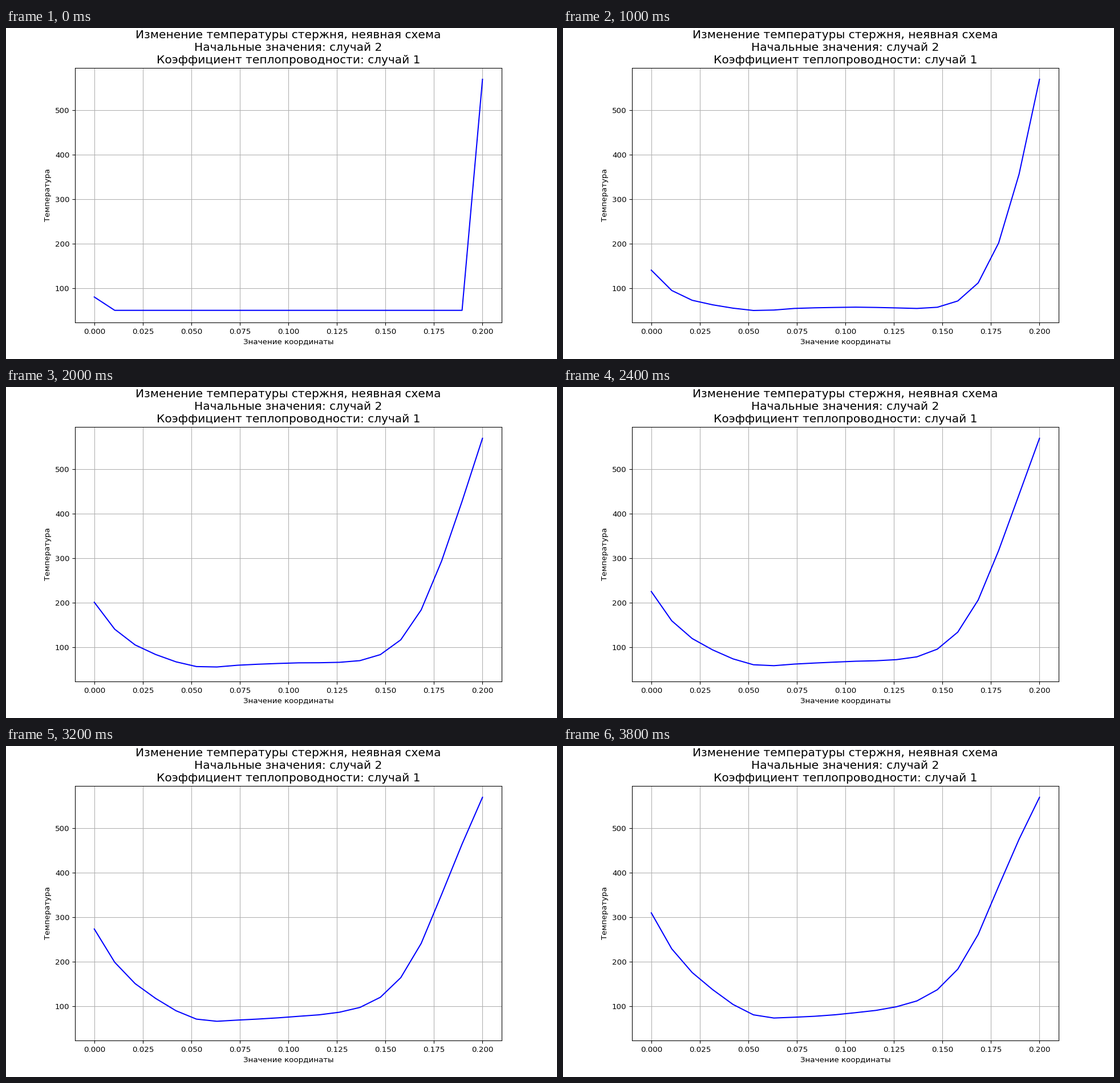
Animation of 966 by 580 pixels, one loop 4 s. Source, as a matplotlib script:

```python
import numpy as np
import matplotlib.pyplot as plt
from matplotlib.animation import FuncAnimation

plt.rcParams["font.family"] = "DejaVu Sans"

WIDTH, HEIGHT, DPI = 966, 580, 96.6
FRAMES, INTERVAL = 20, 200
LENGTH = 0.2
T_START, T_LEFT, T_RIGHT = 50.0, 80.0, 570.0
T_MIN = 48.5
LEFT_RATE = 12.1     # warming of the left end per step
DIFFUSION = 0.37     # k * dt / dx^2

# Relative heat gain per step at each inner node
GAIN = np.array([0, 18, 38, 12, -34, -10, 30, 24, 25,
                 33, 27, 25, 4, -17, -33, -19, 18, 16]) / 1000
N = len(GAIN) + 2


def solve():
    """Implicit scheme for the rod, one row of temperatures per step."""
    a = np.eye(N)
    for i in range(1, N - 1):
        a[i, i - 1:i + 2] = -DIFFUSION, 1 + 2 * DIFFUSION, -DIFFUSION
    u = np.full(N, T_START)
    u[0], u[-1] = T_LEFT, T_RIGHT
    rows = [u]
    for k in range(1, FRAMES):
        rhs = rows[-1].copy()
        rhs[0] = T_LEFT + LEFT_RATE * k
        rhs[1:-1] *= 1 + GAIN
        rows.append(np.linalg.solve(a, rhs))
    return rows


x = np.linspace(0, LENGTH, N)
temps = solve()

# The small surplus keeps the pixel size from being rounded down
fig, ax = plt.subplots(figsize=((WIDTH + 0.01) / DPI, (HEIGHT + 0.01) / DPI),
                       dpi=DPI)
fig.subplots_adjust(left=0.125, right=0.9, bottom=0.11, top=0.88)
pad = 0.05 * (T_RIGHT - T_MIN)
ax.set_xlim(-0.05 * LENGTH, 1.05 * LENGTH)
ax.set_ylim(T_MIN - pad, T_RIGHT + pad)
ax.set_title("Изменение температуры стержня, неявная схема\n"
             "Начальные значения: случай 2\n"
             "Коэффициент теплопроводности: случай 1", fontsize=15)
ax.set_xlabel("Значение координаты")
ax.set_ylabel("Температура")
ax.grid(True)
line, = ax.plot(x, temps[0], "b")


def update(k):
    line.set_ydata(temps[k])
    return line,


anim = FuncAnimation(fig, update, frames=FRAMES, interval=INTERVAL,
                     repeat=True, repeat_delay=0)
plt.show()
```
